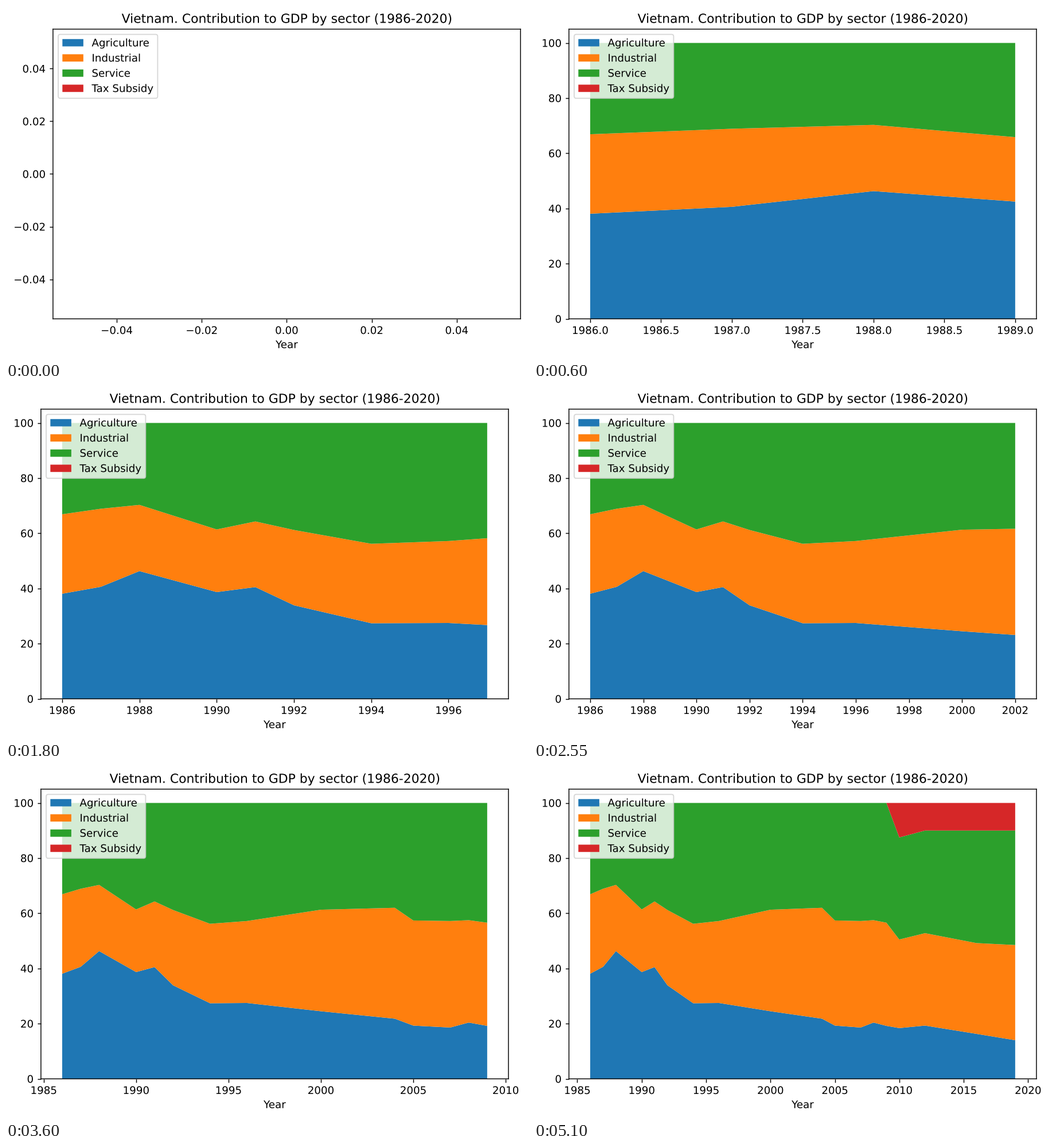
A matplotlib script for the animation above (5250 ms loop, 910 px wide and 615 px high).

```python
import matplotlib.pyplot as plt
import numpy as np
from matplotlib.animation import FuncAnimation
from matplotlib.patches import Patch
from matplotlib.patheffects import Normal

W, H, DPI = 910, 615, 131.45
AX_W, TOP, BOTTOM = 815, 40.45, 546.55

# Unsnapped lines and outline text allow positions between whole pixels
plt.rcParams.update({
    "font.family": "DejaVu Sans",
    "path.snap": False,
    "path.effects": [Normal()],
    "text.hinting": "none",
})

SECTORS = ["Agriculture", "Industrial", "Service", "Tax Subsidy"]
COLORS = ["#1f77b4", "#ff7f0e", "#2ca02c", "#d62728"]

# Turning points: year, top of agriculture, top of industry (percent)
KEYS = [
    (1986, 38.1, 66.9), (1987, 40.6, 68.9), (1988, 46.3, 70.3),
    (1990, 38.7, 61.4), (1991, 40.5, 64.3), (1992, 33.9, 61.2),
    (1994, 27.4, 56.2), (1996, 27.5, 57.2), (2000, 24.5, 61.3),
    (2004, 21.8, 62.0), (2005, 19.3, 57.4), (2007, 18.6, 57.2),
    (2008, 20.4, 57.5), (2009, 19.2, 56.6), (2010, 18.4, 50.5),
    (2012, 19.3, 52.8), (2016, 16.3, 49.2), (2019, 14.0, 48.5),
]

years = np.arange(1986, 2020)
key_years, *key_tops = zip(*KEYS)
tops = [np.interp(years, key_years, t) for t in key_tops]
tax = np.interp(years, [2009, 2010, 2012], [0, 12.5, 10])
shares = np.diff([0 * tax, *tops, 100 - tax, 0 * tax + 100], axis=0)

fig = plt.figure(figsize=(W / DPI + 1e-6, H / DPI + 1e-6), dpi=DPI)
ax = fig.add_axes([0, 0, 1, 1])
handles = [Patch(facecolor=c, linewidth=0, label=s) for s, c in zip(SECTORS, COLORS)]


def update(n):
    """Show the first n years."""
    ax.clear()
    left = 60.9 if n else 81.9
    ax.set_position([left / W, 1 - BOTTOM / H, AX_W / W, (BOTTOM - TOP) / H])
    if n:
        ax.stackplot(years[:n], shares[:, :n], colors=COLORS)
        ax.set_ylim(0, 105)
    else:
        ax.set(xlim=(-0.055, 0.055), ylim=(-0.055, 0.055))
    ax.set_title("Vietnam. Contribution to GDP by sector (1986-2020)")
    ax.set_xlabel("Year")
    ax.legend(handles=handles, loc="upper left")


anim = FuncAnimation(fig, update, frames=len(years) + 1, interval=150,
                     repeat=True, repeat_delay=0)
plt.show()
```
